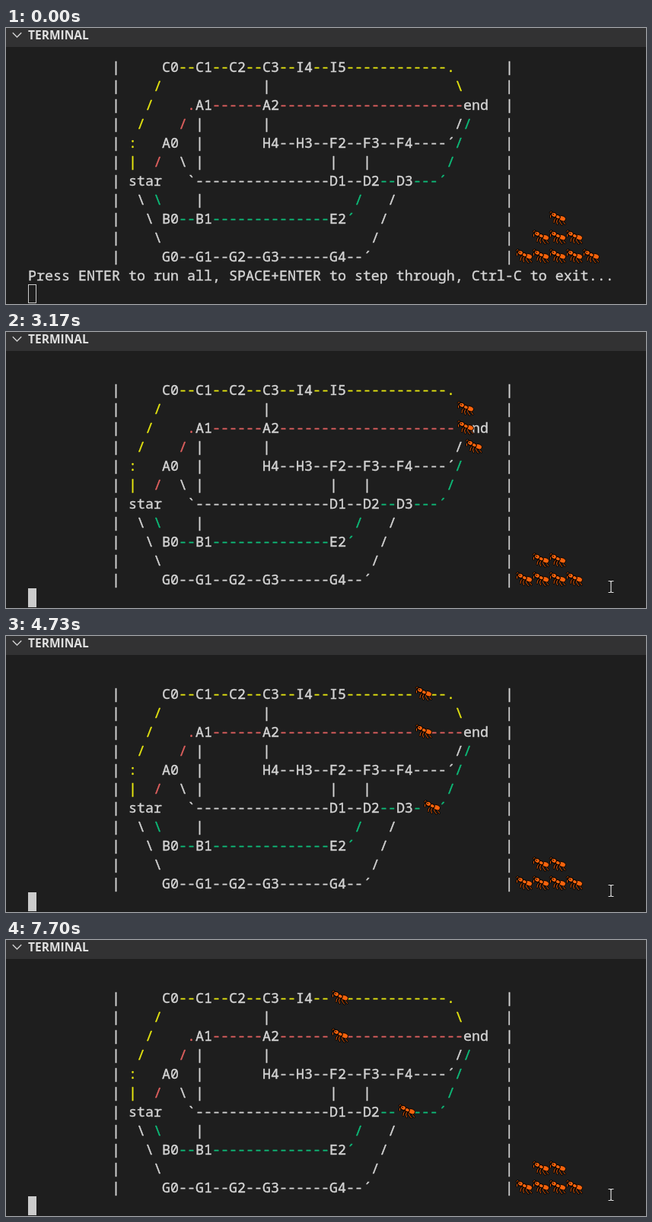
Animation, 841 px wide and 364 px high, one loop 8000 ms. Source, as an HTML page:

```html
<!DOCTYPE html>
<html lang="en">
<head>
<meta charset="utf-8">
<title>Ant farm terminal</title>
<style>
  html, body { margin: 0; width: 100%; height: 100%; overflow: hidden; background: #1e1e1e; }
  header {
    position: absolute; top: 0; left: 0; right: 0; height: 25px; padding-left: 29px;
    background: #323233; color: #e0e0e0;
    font: 700 15.5px/18px "Open Sans", sans-serif;
  }
  .chevron { position: absolute; left: 8px; top: 4px; fill: none; stroke: #d0d0d0; stroke-width: 1.4; }
  #term { position: absolute; left: 29px; top: 38px; width: 812px; height: 326px; overflow: hidden; }
  #page { position: absolute; inset: 0; }
  pre {
    margin: 0; color: #d4d4d4; -webkit-text-stroke: .4px;
    font: 18.333px/25px "Noto Sans Mono", monospace;
  }
  i { font-style: normal; }
  .y { color: #e5e510; }
  .r { color: #e0605f; }
  .g { color: #0dbc79; }
  .ant { position: absolute; left: 0; top: 0; width: 22px; height: 25px; overflow: visible; }
  .ant.walking { background: #1e1e1e; }
  #cursor {
    position: absolute; left: 0; top: 300px; width: 11px; height: 25px;
    box-sizing: border-box; border: 1px solid #ccc;
  }
  #cursor.focus { background: #ccc; }
  #mouse { position: absolute; left: -5px; top: -9px; visibility: hidden; }
</style>
</head>
<body>
<header>
  <svg class="chevron" width="13" height="11"><path d="M.8 2.2 6.5 8 12.2 2.2"/></svg>
  TERMINAL
</header>

<div id="term">
  <div id="page">
<pre id="map">
     C0{y--}C1{y--}C2{y--}C3{y--}I4{y--}I5{y------------.}
    {y/}            |                      {y\}
   {y/}    {r.}A1{r------}A2{r----------------------}end
  {y/}    {r/} |       |                      /{g/}
 {y:}   A0  |       H4--H3--F2--F3--F4----´{g/}
 {y|}  {r/}  \ |               |   |         {g/}
 star   `----------------D1--D2{g--}D3{g---´}
  \ {g\}    |                  {g/}   /
   \ B0{g--}B1{g--------------}E2{g´}   /
    \                         /
     G0--G1--G2--G3------G4--´</pre>
<pre id="prompt">Press ENTER to run all, SPACE+ENTER to step through, Ctrl-C to exit...</pre>
  </div>
  <div id="cursor"></div>
</div>

<svg width="0" height="0" style="position:absolute">
  <defs>
    <path id="beam" fill="none" d="M1.5 1.5H4L5 2.5 6 1.5H8.5M5 2.5V15.5M1.5 16.5H4L5 15.5 6 16.5H8.5"/>
    <path id="limbs" fill="none" stroke-linecap="round" stroke-linejoin="round"
      d="M7.5 8 4.5 9 4.5 12M8 7 5.5 4.5 4 5.5M12.5 12 9.5 15 9 18.5M14 13.5 12.5 17 13.5 20.5M16 13 17 18 19.5 21.5M16.5 12 22 18.5 23.5 20.5"/>
    <g id="ant">
      <use href="#limbs" stroke="#000" stroke-width="2.6"/>
      <use href="#limbs" stroke="#f7630c" stroke-width=".9"/>
      <g fill="#f7630c" stroke="#000">
        <ellipse cx="20" cy="13.2" rx="4.6" ry="3.4" transform="rotate(25 20 13.2)"/>
        <ellipse cx="14" cy="11" rx="3.4" ry="2.4" transform="rotate(25 14 11)"/>
        <ellipse cx="9" cy="8.3" rx="3.4" ry="2.9" transform="rotate(25 9 8.3)"/>
      </g>
      <circle cx="8.2" cy="7.8" r=".8"/>
    </g>
  </defs>
</svg>

<svg id="mouse" width="10" height="18">
  <use href="#beam" stroke="#111" stroke-width="2.6"/>
  <use href="#beam" stroke="#e8e8e8" stroke-width="1.2"/>
</svg>

<script>
const LOOP = 8000, CELL = 11, LINE = 25;
const SCROLL = 2140, CLEAR = 3170, FOCUS = 1055;
const $ = id => document.getElementById(id);
const page = $('page'), map = $('map'), promptLine = $('prompt'), cursor = $('cursor'), mouse = $('mouse');

// Frame each map row with walls and turn {y..} marks into coloured spans.
const MARK = /\{([yrg])(.+?)\}/g;
map.innerHTML = map.textContent.split('\n').map(row => {
  const width = row.replace(MARK, '$2').length;
  const colored = row.replace(MARK, '<i class="$1">$2</i>');
  return ' '.repeat(10) + '|' + colored + ' '.repeat(46 - width) + '|';
}).join('\n');

function place(ant, [col, row]) {
  ant.style.transform = `translate(${col * CELL}px, ${row * LINE}px)`;
}

function addAnt(pos) {
  const ant = document.createElementNS('http://www.w3.org/2000/svg', 'svg');
  ant.setAttribute('class', 'ant');
  ant.innerHTML = '<use href="#ant"/>';
  page.append(ant);
  place(ant, pos);
  return ant;
}

for (const col of [60, 62]) addAnt([col, 9]);
for (const col of [58, 60, 62, 64]) addAnt([col, 10]);

// Walkers wait at the end of each pile row, then follow a path by step k.
const walkers = [
  { home: [62, 8], path: k => [k > 13 ? 36 : 51 - k, k ? 0 : 1] },
  { home: [64, 9], path: k => [51 - k, 2] },
  { home: [66, 10], path: k => [k < 7 ? 52 - k : 44, Math.min(3 + k, 6)] },
].map(w => ({ ...w, el: addAnt(w.home) }));

const steps = [CLEAR, 3490, 3800, 4120, 4420, 4730, 5050, 5280,
  5680, 5910, 6220, 6540, 6850, 7080, 7380, 7700];

// time, x, y
const pointer = [[440, 777, 357], [517, 782, 351], [593, 789, 343], [670, 795, 336],
  [980, 801, 331], [1055, 798, 333], [1130, 795, 336]];

function render(t) {
  const shift = t < SCROLL ? 0 : t < CLEAR ? -LINE : LINE;
  page.style.transform = `translateY(${shift}px)`;
  promptLine.style.visibility = t < CLEAR ? 'visible' : 'hidden';
  cursor.classList.toggle('focus', t >= FOCUS);

  const spot = pointer.findLast(p => t >= p[0]);
  mouse.style.visibility = spot ? 'visible' : 'hidden';
  if (spot) mouse.style.transform = `translate(${spot[1]}px, ${spot[2]}px)`;

  const k = steps.findLastIndex(s => t >= s);
  for (const { el, home, path } of walkers) {
    el.classList.toggle('walking', k >= 0);
    place(el, k < 0 ? home : path(k));
  }
}

let start;
function tick(now) {
  start ??= now;
  render((now - start) % LOOP);
  requestAnimationFrame(tick);
}
requestAnimationFrame(tick);
</script>
</body>
</html>
```
